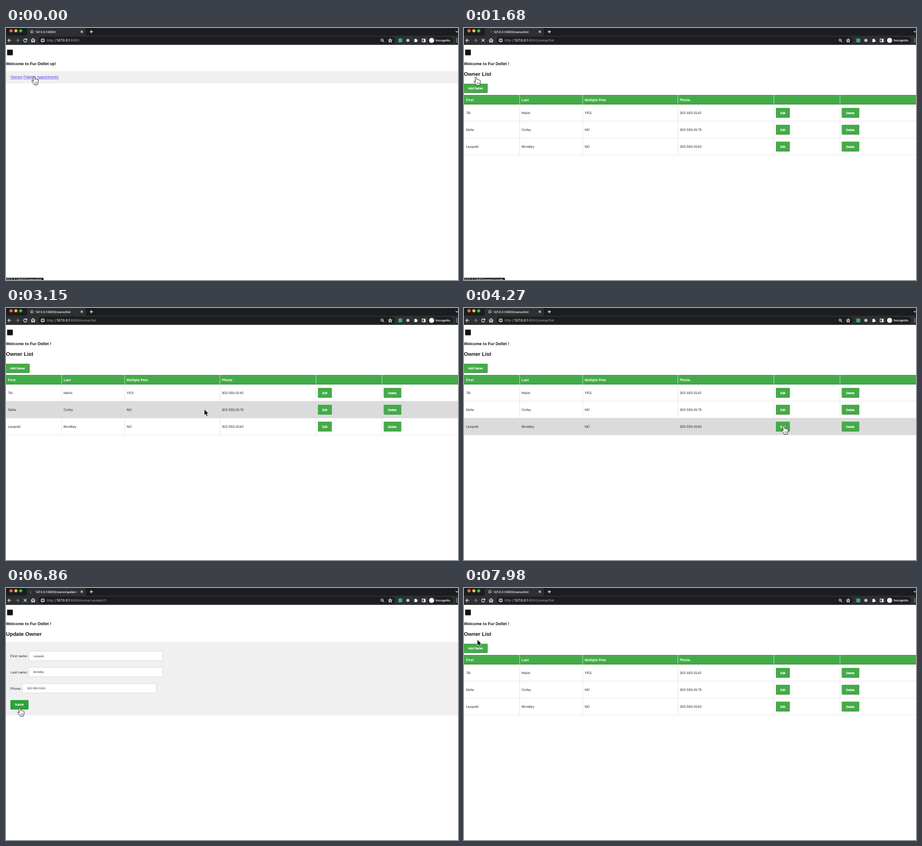
Recreate the animation shown at these times as an HTML page. Size 800 by 448 pixels, loop 8 s.

```html
<!DOCTYPE html>
<html lang="en">
<head>
<meta charset="utf-8">
<title>Owner list demo</title>
<style>
  html, body { margin: 0; width: 100%; height: 100%; overflow: hidden; background: #fff; }
  svg { display: block; }
  text { font: 6.2px "Liberation Sans", Arial, sans-serif; fill: #2b2b2b; white-space: pre; text-rendering: geometricPrecision; }
  .h2 { font-size: 9.3px; font-weight: bold; fill: #111; }
  .h3 { font-size: 7.22px; font-weight: bold; fill: #111; }
  .th { font-weight: bold; fill: #fff; }
  .link { fill: #4437ee; text-decoration: underline; }
  .btn { font-size: 5.17px; fill: #fff; stroke: #fff; stroke-width: .25px; }
  .field { font-size: 5.17px; }
  .tab { font: 600 5.1px Inter, sans-serif; fill: #f4f5f6; }
  .url { font: 6px Inter, sans-serif; fill: #a4a9ae; }
  .host { font-weight: 500; fill: #fff; }
  .icon { fill: none; stroke: #f4f5f6; stroke-width: 1.05; }
</style>
</head>
<body>
<svg id="stage" width="800" height="448" viewBox="0 0 800 448"></svg>
<script>
const GREEN = '#45ab49', DARK = '#1c1d20', BAR = '#2e2f32';
const LOOP = 8000, STEP = 70;

const text = (x, y, s, cls = '', extra = '') => `<text x="${x}" y="${y}" class="${cls}" ${extra}>${s}</text>`;
const rect = (x, y, w, h, fill, extra = '') =>
  `<rect x="${x}" y="${y}" width="${w}" height="${h}" fill="${fill}" ${extra}/>`;
const circle = (x, y, r, fill, extra = '') => `<circle cx="${x}" cy="${y}" r="${r}" fill="${fill}" ${extra}/>`;
const icon = (d, extra = '') => `<path class="icon" d="${d}" ${extra}/>`;
const group = (id, body) => `<g id="${id}">${body}</g>`;

const button = (x, y, w, h, label, pad) =>
  rect(x, y, w, h, '#338a38', 'rx="1"') +
  rect(x, y, w - .8, h - .9, GREEN, 'rx="1"') +
  text(x + pad, y + h / 2 + 1.8, label, 'btn');

function browser() {
  return rect(0, 0, 800, 30, BAR) + rect(0, 0, 800, 13.5, DARK) +
    `<path fill="${BAR}" d="M34 14Q37 14 37 11V4Q37 0 41 0H137Q141 0 141 4V11Q141 14 144 14Z"/>` +
    ['#ff5f57', '#febc2e', '#28c840'].map((c, i) => circle(9 + i * 8.5, 5, 2.8, c)).join('') +
    group('globe', circle(46, 6.6, 2.9, '#b4b7bb') + icon('M44 5L46 6.6L44.6 8M47 4.2L47.6 6.2L46.6 8.6', `style="stroke:${BAR}"`)) +
    group('spinner', icon('M46 4A2.7 2.7 0 0 1 48.7 6.7', 'opacity=".35"')) +
    text(52.5, 8.6, '', 'tab', 'id="title"') +
    rect(120, 1, 10, 12, 'url(#fade)') + rect(130, 1, 10.5, 12, BAR) +
    icon('M132.4 4.9L135.8 8.3M135.8 4.9L132.4 8.3M148.2 6.6H153.8M151 3.8V9.4M796 5.5L798 7.5L800 5.5') +
    icon('M9.3 22H3.5M6.2 19.2L3.4 22L6.2 24.8') +
    icon('M17 22H22.8M20.1 19.2L22.9 22L20.1 24.8', 'opacity=".45"') +
    group('reload', icon('M36.2 20.3A2.8 2.8 0 1 0 36.8 22.6M36.8 18.7V21H34.5')) +
    group('stop', icon('M31.4 19.4L36.4 24.4M36.4 19.4L31.4 24.4')) +
    icon('M44.4 22L48 18.8L51.6 22M45.5 21.4V25H47.1V22.7H48.9V25H50.5V21.4') +
    rect(57.5, 15.6, 631, 12.8, DARK, 'rx="6.4"') +
    icon('M65 21.6V23.7M65 20V20.7') + circle(65, 22, 2.8, 'none', 'class="icon"') +
    text(72, 24.1, 'http://', 'url') +
    text(89.5, 24.1, '<tspan class="host">127.0.0.1</tspan>:8000<tspan id="path"></tspan>', 'url') +
    circle(665.6, 21.4, 1.9, 'none', 'class="icon"') + icon('M667 22.8L669.2 25') +
    icon('M680 19L680.9 21L683.1 21.2L681.4 22.7L681.9 24.9L680 23.7L678.1 24.9L678.6 22.7L676.9 21.2L679.1 21Z') +
    rect(694.5, 18.7, 6.6, 6.6, '#2cb58c') + circle(711.3, 22, 2.8, '#c9ccd0') +
    `<path fill="#f4f5f6" d="M722.5 20H724A1.1 1.1 0 0 1 726.2 20H727.5V21.5A1.1 1.1 0 0 1 727.5 23.7V25H722.5V23.4A1.1 1.1 0 0 0 722.5 21.3Z"/>` +
    icon('M736.6 19.4H742V24.7H736.6Z') + rect(739.4, 19.2, 2.8, 5.7, '#f4f5f6') +
    rect(747, 16, 44, 12, DARK, 'rx="6"') + circle(753.3, 22, 4.6, '#f1f3f4') +
    text(760.6, 24.1, 'Incognito', 'tab', 'style="font-size:5.7px"') +
    [19.3, 22, 24.7].map(y => circle(798, y, .8, '#f4f5f6')).join('');
}

function homePage() {
  return rect(0, 76.5, 800, 22.2, '#f0f0f0') +
    text(8, 89.2, 'Owners', 'link', 'id="owners"') + text(31, 89.2, 'Patients', 'link') +
    text(55, 89.2, 'Appointments', 'link');
}

function listPage() {
  const cols = [0, 98.5, 210, 378.5, 548.5, 665.5];
  const heads = ['First', 'Last', 'Multiple Pets', 'Phone'];
  const rows = [
    ['Tib', 'Marlo', 'YES', '302-555-0142'],
    ['Delia', 'Corby', 'NO', '302-555-0179'],
    ['Leopold', 'Brindley', 'NO', '302-555-0163'],
  ];
  const cells = (row, y, cls) => row.map((s, i) => text(cols[i] + 3.4, y, s, cls)).join('');
  const bars = (y, h, c) => cols.slice(1).map(x => rect(x - .35, y, .7, h, c)).join('');
  return text(0, 85.2, 'Owner List', 'h2') + button(0, 99, 41.8, 16.5, 'Add Owner', 7.6) +
    rect(0, 119, 800, 17, GREEN) + rect(0, 134.8, 800, 1, '#338f37') + rect(0, 119, 800, .7, '#39993d') +
    bars(119, 17, '#d5ead6') + cells(heads, 129.5, 'th') +
    rect(0, 166, 800, 30, '#dbdbdb', 'id="hover"') + bars(136, 89.5, '#ddd') +
    rows.map((row, i) => {
      const y = 136 + i * 30;
      return rect(0, y + 29.4, 800, .6, '#ddd') + cells(row, y + 16.8, '') +
        button(552, y + 6, 24.6, 17.4, 'Edit', 7.8) + button(668.7, y + 6, 30.8, 17.4, 'Delete', 7.6);
    }).join('');
}

function formPage() {
  const input = (x, y, label, value) => text(7.8, y + 10.4, label) +
    rect(x, y, 236.5, 16.6, '#fff', 'stroke="#ccc" stroke-width=".6" rx="1"') +
    text(x + 8, y + 10.2, value, 'field');
  return text(0, 85.2, 'Update Owner', 'h2') + rect(0, 96, 800, 130.8, '#f0f0f0') +
    input(40.6, 112.3, 'First name:', 'Leopold') +
    input(40.6, 141.2, 'Last name:', 'Brindley') +
    input(29.4, 170.1, 'Phone:', '302-555-0163') +
    rect(7.8, 199.2, 32, 16.8, '#25992f', 'rx="1"') +
    rect(8.6, 200, 30.1, 14.9, GREEN, 'id="submit"') +
    text(15.5, 209.4, 'Submit', 'btn');
}

const cursors =
  group('arrow', '<path d="M0 0V11L2.5 8.7L4.3 12.8L6.2 12L4.4 8H7.6Z" stroke="#fff" stroke-width=".7"/>') +
  group('hand', `<path d="M-1.3 .6C-1.3 -1.2 1.3 -1.2 1.5 .4L2 4C2.6 3.3 4 3.5 4.2 4.3C5 3.7 6 4 6.2 4.9C7 4.6 8 5 8 6V9
    C8 11 7 11.5 6.8 14H1C.6 12 -1.5 10 -3 8C-4 6.5 -2.8 5.8 -1.6 6.8L-.4 7.8Z" fill="#fff" stroke="#222" stroke-width=".9"/>
    <path d="M2.4 8.8V11.8M4 8.8V11.8M5.6 8.8V11.8" stroke="#333" stroke-width=".6"/>`);

const stage = document.getElementById('stage');
stage.innerHTML =
  `<defs><linearGradient id="fade"><stop stop-color="${BAR}" stop-opacity="0"/><stop offset="1" stop-color="${BAR}"/></linearGradient></defs>` +
  rect(0, 0, 800, 448, '#fff') + browser() + rect(2, 38.5, 10, 10, '#111') +
  text(0, 66.3, '', 'h3', 'id="welcome"') +
  group('home', homePage()) + group('list', listPage()) + group('form', formPage()) +
  group('status', rect(-2, 444, 10, 8, DARK, 'rx="1.5" id="statusBox"') + text(-.5, 449.2, '', 'tab', 'id="statusText"')) +
  group('cursor', cursors);

const $ = id => document.getElementById(id);
const show = (id, on) => $(id).style.display = on ? '' : 'none';
const within = (v, a, b) => v >= a && v < b;

// Pointer tip: time, x, y
const track = [
  [0, 49, 87], [210, 49, 87], [560, 42, 86], [980, 26, 85], [1190, 21, 88], [1680, 21, 88],
  [1960, 23, 100], [2450, 27, 105], [2590, 42, 112], [2870, 210, 158], [3150, 351, 180],
  [3430, 375, 184], [3780, 500, 203], [4130, 564, 210], [4270, 565.5, 210.5], [5390, 565.5, 210.5],
  [5600, 537.5, 207], [5880, 290, 211], [6230, 62, 216], [6510, 24.5, 214.5],
  [6930, 24, 214], [7140, 26, 198], [7630, 27, 128], [7980, 23.5, 91.5], [8000, 23.5, 91.5],
];

function pointer(t) {
  const i = track.findIndex(k => k[0] > t);
  const [t0, x0, y0] = track[i - 1], [t1, x1, y1] = track[i];
  const f = (t - t0) / (t1 - t0);
  return [x0 + (x1 - x0) * f, y0 + (y1 - y0) * f];
}

function overTarget(page, x, y) {
  if (page === 'home') return true;
  if (page === 'form') return x < 40 && within(y, 199, 216);
  const inRow = y > 136 && within((y - 136) % 30, 6, 23.4);
  return x < 42 && within(y, 99, 115) || inRow && (within(x, 552, 577) || within(x, 669, 700));
}

function status(t) {
  if (t < 1050) return ['/patient/list', 1];
  if (t < 1680) return ['/owner/list', 1];
  if (t < 2870) return ['/owner/create', Math.min(1, (2870 - t) / 210)];
  return ['/owner/update/3', Math.max(0, Math.min(1, (t - 4270) / 210, (5740 - t) / 280))];
}

function draw(now) {
  const t = Math.floor(now % LOOP / STEP) * STEP;
  const page = t < 1680 ? 'home' : within(t, 5180, 6930) ? 'form' : 'list';
  const path = { home: '', list: '/owner/list', form: '/owner/update/3' }[page];
  const [x, y] = pointer(t);
  const loading = within(t, 1470, 1820) || within(t, 4830, 5320) || within(t, 6860, 7140);
  const over = overTarget(page, x, y);
  const hand = over || within(t, 1680, 1960);

  for (const id of ['home', 'list', 'form']) show(id, id === page);
  $('welcome').textContent = 'Welcome to Fur Dellet ' + (page === 'home' ? 'vp!' : '!');
  $('title').textContent = '127.0.0.1:8000' + path.slice(0, 14);
  $('path').textContent = path;

  show('globe', !loading);
  show('spinner', loading);
  show('reload', !loading);
  show('stop', loading);
  $('spinner').setAttribute('transform', `rotate(${t * .45} 46 6.7)`);

  $('owners').style.fill = within(t, 1400, 1540) ? '#e00' : '';
  $('submit').setAttribute('fill', page === 'form' && over ? '#2ba238' : GREEN);
  show('hover', within(y, 136, 225.9));
  $('hover').setAttribute('y', 136 + Math.floor((y - 136) / 30) * 30);

  const [link, alpha] = status(t);
  $('status').setAttribute('opacity', alpha);
  $('statusText').textContent = '127.0.0.1:8000' + link;
  $('statusBox').setAttribute('width', { '/patient/list': 68.5, '/owner/list': 64, '/owner/create': 74.5 }[link] || 80.5);

  show('hand', hand);
  show('arrow', !hand);
  $('cursor').setAttribute('transform', `translate(${x} ${y})`);
}

const start = performance.now();
function tick() {
  draw(performance.now() - start);
  requestAnimationFrame(tick);
}
tick();
</script>
</body>
</html>
```
